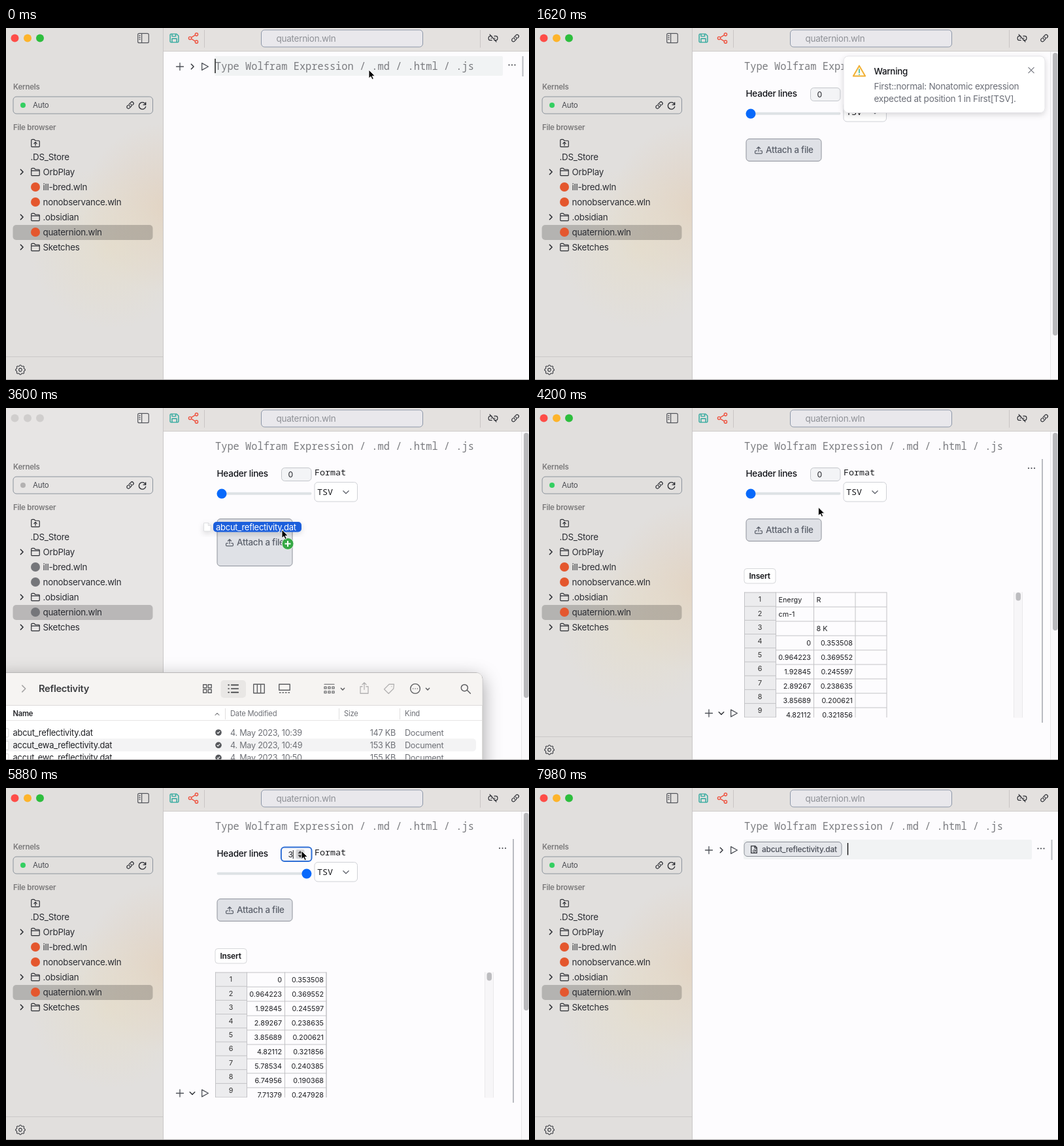
An HTML page that plays this animation: 800x538 px, repeating every 8 s.

```html
<!DOCTYPE html>
<html lang="en">
<head>
<meta charset="utf-8">
<title>Notebook: attach a data file</title>
<style>
  html, body { margin: 0; width: 100%; height: 100%; overflow: hidden; background: #fdfcfe; }
  svg { display: block; width: 100vw; height: 100vh; }
  text { font-family: Inter, sans-serif; letter-spacing: -.02em; white-space: pre; }
  #sheet text { letter-spacing: 0; }
  .mono { font-family: "Noto Sans Mono", monospace; letter-spacing: 0; }
</style>
</head>
<body>
<svg id="stage" viewBox="0 0 800 538"></svg>
<script>
const LOOP = 8000;
const INK = '#2b2d33', GREY = '#6e7076';

// ---- drawing helpers
const text = (x, cy, s, size = 13.4, fill = INK, more = '') =>
  `<text x="${x}" y="${cy + size * .36}" font-size="${size}" fill="${fill}" ${more}>${s}</text>`;
const mono = (x, cy, s, size, fill) => text(x, cy, s, size, fill, 'class="mono"');
const rect = (x, y, w, h, r, fill, stroke = 'none', more = '') =>
  `<rect x="${x}" y="${y}" width="${w}" height="${h}" rx="${r}" fill="${fill}" stroke="${stroke}" ${more}/>`;
const dot = (x, y, r, fill, more = '') => `<circle cx="${x}" cy="${y}" r="${r}" fill="${fill}" ${more}/>`;
const line = (x1, y1, x2, y2, stroke, w = 1) =>
  `<path d="M${x1} ${y1}L${x2} ${y2}" stroke="${stroke}" stroke-width="${w}"/>`;
const icon = (x, y, size, d, stroke = INK, w = 1.2, fill = 'none') =>
  `<path transform="translate(${x - size / 2} ${y - size / 2}) scale(${size / 24})" d="${d}" fill="${fill}"
    stroke="${stroke}" stroke-width="${w * 24 / size}" stroke-linecap="round" stroke-linejoin="round"/>`;
const group = (id, body, more = '') => `<g id="${id}" ${more}>${body}</g>`;

const ICON = {
  right: 'M8 3l9 9-9 9',
  down: 'M3 8l9 9 9-9',
  up: 'M3 16l9-9 9 9',
  plus: 'M12 1v22M1 12h22',
  play: 'M4 2v20l18-10z',
  folder: 'M2 9V5q0-2 2-2h5l3 3h8q2 0 2 2v11q0 2-2 2H4q-2 0-2-2V9h20',
  upFolder: 'M2 5q0-2 2-2h5l3 3h8q2 0 2 2v11q0 2-2 2H4q-2 0-2-2zM12 18v-8M8.5 13l3.5-3.5 3.5 3.5',
  link: 'M13.2 8.7a4.5 4.5 0 0 1 1.2 7.2l-4.5 4.5a4.5 4.5 0 0 1-6.4-6.4L5.3 12.3M18.7 11.7l1.8-1.8a4.5 4.5 0 0 0-6.4-6.4L9.6 8a4.5 4.5 0 0 0 1.2 7.2',
  unlink: 'M9 7H5a4 4 0 0 0-4 4v2a4 4 0 0 0 4 4h4M15 7h4a4 4 0 0 1 4 4v2a4 4 0 0 1-4 4h-4M7 12h2M15 12h2M4 3l16 18',
  refresh: 'M20 5v6h-6M20 11A9 9 0 1 0 20 16',
  panel: 'M4 3h16q2.5 0 2.5 2.5v13q0 2.5-2.5 2.5H4q-2.5 0-2.5-2.5v-13Q1.5 3 4 3zM9 3v18M4 7h2M4 10.5h2M4 14h2',
  save: 'M3 5q0-2 2-2h12l4 4v12q0 2-2 2H5q-2 0-2-2zM7 3v5h8V3M7 21v-8h10v8',
  share: 'M8 10.5l8-5M8 13.5l8 5M8 12a3 3 0 1 1-6 0 3 3 0 0 1 6 0zM22 4a3 3 0 1 1-6 0 3 3 0 0 1 6 0zM22 20a3 3 0 1 1-6 0 3 3 0 0 1 6 0z',
  upload: 'M12 16V3M7 8l5-5 5 5M7 14H4q-2 0-2 2v4q0 2 2 2h16q2 0 2-2v-4q0-2-2-2h-3',
  cross: 'M3 3l18 18M21 3L3 21',
  doc: 'M4 2h11l5 5v15H4zM14 2v6h6',
  grid: 'M2 2h8v8H2zM14 2h8v8h-8zM2 14h8v8H2zM14 14h8v8h-8z',
  list: 'M8 4h15M8 12h15M8 20h15M1.5 4h1.5M1.5 12h1.5M1.5 20h1.5',
  columns: 'M1 3h22v18H1zM8.5 3v18M15.5 3v18',
  gallery: 'M1 3h22v12H1zM2 20h2M8 20h2M14 20h2M20 20h2',
  rows: 'M2 3h20M2 8h4v4H2zM10 8h4v4h-4zM18 8h4v4h-4zM2 17h4v4H2zM10 17h4v4h-4zM18 17h4v4h-4z',
  export: 'M12 15V1M8 5l4-4 4 4M8 9H4v14h16V9h-4',
  tag: 'M22 3l-10 0L2 13l9 9 10-10zM17 7.5h.1',
  more: 'M23 12a11 11 0 1 1-22 0 11 11 0 0 1 22 0zM7 12h.1M12 12h.1M17 12h.1',
  search: 'M17 10a7.5 7.5 0 1 1-15 0 7.5 7.5 0 0 1 15 0zM15.5 15.5L23 23'
};

const gear = (x, y) => {
  let d = '';
  for (let i = 0; i < 32; i++) {
    const r = i % 4 < 2 ? 11 : 9, a = (i - .5) * Math.PI / 16;
    d += (i ? 'L' : 'M') + (12 + r * Math.cos(a)).toFixed(1) + ' ' + (12 + r * Math.sin(a)).toFixed(1);
  }
  return icon(x, y, 16, d + 'ZM15.5 12a3.5 3.5 0 1 1-7 0 3.5 3.5 0 0 1 7 0z', '#3c3e44', 1.1);
};
const dots = (x, y) => [-4.5, 0, 4.5].map(k => dot(x + k, y, 1.1, '#45474d')).join('');
const controls = (y, open) =>
  icon(266, y, 12, ICON.plus, '#4c4f56', 1.3) +
  icon(285, y, 10, open ? ICON.down : ICON.right, '#33353b', 1.5) +
  icon(304, y, 13, ICON.play, '#4c4f56', 1.3);
const inputCell = (y) =>
  rect(319, y, 441, 30, 2, '#f1f3f4') + controls(y + 16) + dots(774, y + 13.5) +
  line(790.5, y, 790.5, y + 31, '#b9bbc1', 2);

// ---- scene parts
function sidebar() {
  const rows = [
    ['folder', 'OrbPlay', 220], ['book', 'ill-bred.wln', 243], ['book', 'nonobservance.wln', 266],
    ['folder', '.obsidian', 289], ['book', 'quaternion.wln', 312], ['folder', 'Sketches', 335]
  ];
  const tree = rows.map(([kind, name, y]) => text(56.5, y, name) + (kind === 'folder'
    ? icon(24, y, 10, ICON.right, '#26282d', 1.5) + icon(45, y, 15, ICON.folder)
    : dot(45, y, 7, '#e4572e', 'class="book"'))).join('');
  return rect(0, 0, 241, 538, 0, '#e7e5e4') +
    group('tint', rect(0, 0, 241, 538, 0, '#e1dfdd') +
      rect(0, 0, 241, 538, 0, 'url(#tan)') + rect(0, 0, 241, 538, 0, 'url(#sand)')) +
    [13.5, 33, 52].map(x => dot(x, 15.5, 6, '#d0cecd', 'class="light"')).join('') +
    icon(210, 15.5, 19, ICON.panel, '#55575d') +
    text(11, 90, 'Kernels', 11.5, '#7b7a7b', 'font-weight="600"') +
    rect(11, 105, 213.5, 26, 5, 'none', '#8b939c') +
    dot(26, 118, 4, '#34cf62', 'id="status"') + text(41, 118, 'Auto', 11.6, '#4b4d53') +
    icon(190, 118, 12.5, ICON.link) + icon(209, 118, 14, ICON.refresh, INK, 1.4) +
    text(11, 151.5, 'File browser', 11.5, '#7b7a7b', 'font-weight="600"') +
    icon(45, 176, 15, ICON.upFolder) + text(37.5, 197, '.DS_Store') +
    rect(10.5, 301, 214, 23, 5, '#000', 'none', 'fill-opacity=".2"') + tree +
    line(0, 502.5, 240, 502.5, '#cbc9c8') + gear(22, 522.5) +
    line(240.5, 0, 240.5, 538, '#c9c7c7');
}

function toolbar() {
  return rect(241, 0, 559, 35, 0, '#e4e1df') + line(241, 35.5, 800, 35.5, '#cfcccb') +
    icon(257.5, 15.5, 17, ICON.save, '#2aa79b', 1.4) + icon(286.5, 15.5, 17, ICON.share, '#ee5340', 1.4) +
    line(303.5, 3, 303.5, 30, '#c9c5c4') + line(725.5, 3, 725.5, 30, '#c9c5c4') +
    rect(390.5, 3, 247, 26, 5, '#e9e8ec', '#8d97a8') + text(413.5, 16, 'quaternion.wln', 13.5, '#8f9197') +
    icon(745, 15.5, 15, ICON.unlink) + icon(779, 15.5, 13, ICON.link);
}

function widget() {
  const field = rect(421.5, 91.5, 45.5, 20, 5, '#f3f4f6', '#c3c6cb') +
    rect(420.9, 90.4, 46.6, 21.6, 5, '#f8f8fa', '#2f6fd6', 'stroke-width="2" id="ring"') +
    rect(443.5, 94, 13, 14, 2, '#d3d3d5', 'none', 'id="spinHover"') +
    group('spin', icon(450, 98.2, 7, 'M2 17l10-12 10 12z', '#333', .5, '#333') +
      icon(450, 104.2, 7, 'M2 7l10 12 10-12z', '#333', .5, '#333')) +
    text(431.5, 101.5, '0', 12.2, '#22242a', 'id="count"') +
    group('spinCaret', line(.5, 95, .5, 108, '#222'));
  return text(322.5, 100.5, 'Header lines', 13.6, '#111318', 'font-weight="500"') + field +
    mono(472, 98, 'Format', 13.35, '#18191d') +
    rect(472, 113.5, 65.5, 29.5, 5, '#fff', '#cfd1d6') + mono(476, 128.5, 'TSV', 13.35, '#18191d') +
    icon(520, 128.5, 11, ICON.down, '#666a72', 1.4) +
    rect(322.5, 128.8, 145, 4, 2, '#dee2e5') + dot(330, 131, 7.5, '#0869fb', 'id="knob"') +
    rect(323, 169.5, 115, 34, 5, '#dfe1e6', '#8e929b', 'id="drop"') +
    group('dropLabel', icon(342, 186.5, 13, ICON.upload, '#5b606b') +
      text(353, 186.5, 'Attach a file', 13.4, '#5b606b', 'font-weight="500"'));
}

function tableFrame() {
  let head = rect(320, 281.5, 48, 200, 0, '#ececee');
  for (let i = 0; i < 10; i++) {
    const y = 282 + i * 21.2;
    head += line(320, y, 368, y, '#c3c3c6') +
      text(344, y + 10.5, i + 1, 10.8, '#333', 'text-anchor="middle"');
  }
  return rect(320, 245.5, 48, 22.5, 4, '#fff', '#d6d7da') +
    text(327.5, 257, 'Insert', 12, '#15161a', 'font-weight="600"') +
    group('sheet', head + group('cells', ''), 'clip-path="url(#sheetClip)"') +
    rect(732, 281.5, 14, 192, 0, '#f7f6f8') + line(732.5, 281.5, 732.5, 473, '#eae9eb') +
    line(745.5, 281.5, 745.5, 473, '#eae9eb') + rect(735.5, 282, 7.5, 12.5, 3.7, '#bdbdc0');
}

// Lines of the file once the first `skip` have been dropped.
const HEADS = [['Energy', 'R'], ['cm-1', ''], ['', '8 K']];
const VALUES = [.353508, .369552, .245597, .238635, .200621, .321856, .240385, .190368, .247928];
function cells(skip) {
  const width = skip < 3 ? 538 : 490;
  const lines = HEADS.concat(VALUES.map((v, i) => [i ? (i * .9642234).toPrecision(6) : '0', v.toFixed(6)]));
  let out = '';
  lines.slice(skip, skip + 9).forEach((row, i) => {
    const y = 282 + i * 22;
    out += line(368, y, width, y, '#c3c3c6');
    row.forEach((s, c) => {
      const isNumber = i + skip >= HEADS.length;
      out += text((isNumber ? [422, 486] : [372.5, 430.5])[c], y + 11, s, 10.8, '#1d1e22',
        isNumber ? 'text-anchor="end"' : '');
    });
  });
  return out + [320.5, 368.5, 426.5, 490, width].map(x => line(x, 281.5, x, 474, '#c3c3c6')).join('');
}

function warning() {
  return rect(472, 43, 308, 86.5, 7, '#fff', '#e3e2e6', 'filter="url(#soft)"') +
    icon(496, 66, 20, 'M12 2L23 21H1z', '#f2b035', 2, '#fffbe9') +
    icon(496, 66.5, 20, 'M12 8v6M12 17.5v.2', '#43b9a8', 1.7) +
    text(518.5, 66.5, 'Warning', 13.4, '#111318', 'font-weight="500"') +
    icon(759, 64.5, 11, ICON.cross, '#777a82', 1.2) +
    text(518.5, 89.5, 'First::normal: Nonatomic expression', 13.6, '#6b6e77') +
    text(518.5, 108.5, 'expected at position 1 in First[TSV].', 13.6, '#6b6e77');
}

function finder() {
  const files = [['abcut', '10:39', 147], ['accut_ewa', '10:49', 153], ['accut_ewc', '10:50', 155]];
  const rows = files.map(([name, time, kb], i) => {
    const y = 496 + i * 19.3;
    return (i === 1 ? rect(-10, y - 10, 729, 19.5, 5, '#f3f3f4') : '') +
      rect(-7, y - 6, 11, 13, 1, '#fff', '#d5d5d5') +
      text(10.5, y, name + '_reflectivity.dat', 12.95, '#202125') +
      dot(325, y, 4.8, '#56585c') + icon(325, y, 5, 'M3 13l6 6L21 5', '#fff', 1.1) +
      text(343, y, '4. May 2023, ' + time, 12.65, GREY) +
      text(596, y, kb + ' KB', 12.65, GREY, 'text-anchor="end"') + text(610, y, 'Document', 12.65, GREY);
  }).join('');
  const titles = [['Date Modified', 343], ['Size', 517], ['Kind', 610]];
  const C = '#5d5e61', PALE = '#b3b2b2';
  return rect(-20, 404.5, 749, 160, 10, '#fff', '#b9b7b7', 'filter="url(#deep)"') +
    `<path d="M-20 454V405H719q9.5 0 9.5 9.5V454z" fill="#f6f4f2"/>` +
    icon(27, 429, 13, ICON.right, '#a5a4a4', 1.6) +
    text(50, 429, 'Reflectivity', 14.7, '#3d3e41', 'font-weight="600"') +
    rect(328.5, 416, 38.5, 27, 5, '#e9e7e5') +
    icon(308, 429, 15, ICON.grid, C, 1.4) + icon(347.5, 429, 17, ICON.list, '#3f4043', 1.6) +
    icon(387, 429, 18, ICON.columns, C, 1.4) + icon(426, 429, 18, ICON.gallery, C, 1.4) +
    icon(494.5, 429, 18, ICON.rows, C, 1.2) + icon(515, 429.5, 7, ICON.down, C, 1.5) +
    icon(548, 428, 18, ICON.export, PALE, 1.3) + icon(586, 429, 18, ICON.tag, PALE, 1.3) +
    icon(626, 429, 16, ICON.more, C, 1.4) + icon(645, 429.5, 7, ICON.down, C, 1.5) +
    icon(703, 429, 16, ICON.search, C, 1.5) +
    line(0, 454.5, 728, 454.5, '#dddbda') + line(0, 477.5, 728, 477.5, '#e6e5e5') +
    text(10.5, 467, 'Name', 11.2, '#25262a', 'font-weight="600"') +
    icon(323, 468, 8, ICON.up, '#85868a', 1.1) +
    titles.map(([s, x]) => text(x, 467, s, 11.2, GREY) + line(x - 7.5, 459, x - 7.5, 476, '#e0dfdf')).join('') + rows;
}

function pointer() {
  const drag = icon(-114, -4, 15, ICON.doc, '#dcdde0', 1, '#fff') +
    rect(-105, -12, 135, 15.5, 5, '#1c5fdc') + text(-101, -4, 'abcut_reflectivity.dat', 13, '#fff');
  const badge = dot(9, 21.5, 9, '#36a845', 'stroke="#e9f3e9"') +
    line(4.5, 21.5, 13.5, 21.5, '#fff', 2) + line(9, 17, 9, 26, '#fff', 2);
  return group('mouse', group('drag', drag, 'filter="url(#soft)"') + group('badge', badge) +
    group('arrow', '<path d="M0 0V12.8L3 10.2L5.1 14.6L7.3 13.6L5.2 9.3H9.3Z" fill="#000" stroke="#fff" stroke-width=".9"/>') +
    group('beam', '<path d="M-3.5-7Q0-7 0-5V5.5Q0 7.5-3.5 7.5M3.5-7Q0-7 0-5M0 5.5Q0 7.5 3.5 7.5M-2 2.5H2" fill="none" stroke="#111" stroke-width="1.3"/>'));
}

const blur = (id, dy, dev, alpha) =>
  `<filter id="${id}" x="-20%" y="-30%" width="140%" height="170%"><feDropShadow dx="0" dy="${dy}" stdDeviation="${dev}" flood-opacity="${alpha}"/></filter>`;
const glow = (id, cx, cy, r, color, alpha) =>
  `<radialGradient id="${id}" gradientUnits="userSpaceOnUse" cx="${cx}" cy="${cy}" r="${r}">
    <stop offset="0" stop-color="${color}" stop-opacity="${alpha}"/><stop offset="1" stop-color="${color}" stop-opacity="0"/></radialGradient>`;

document.getElementById('stage').innerHTML =
  `<defs>${blur('soft', 3, 4, .14)}${blur('deep', 8, 14, .36)}
    ${glow('tan', 245, 275, 130, '#e2cfbb', .75)}${glow('sand', 160, 335, 125, '#e6ddc8', .65)}
    <clipPath id="sheetClip"><rect x="320" y="281" width="220" height="192"/></clipPath></defs>` +
  rect(241, 35, 559, 503, 0, '#fdfcfe') + sidebar() + toolbar() +
  group('firstCell', inputCell(43)) +
  mono(320, 58.5, 'Type Wolfram Expression / .md / .html / .js', 15.35, '#7a7b7f') +
  group('firstCaret', line(320, 47, 320, 69, '#111', 1.4)) +
  group('widget', widget() + rect(789, 36, 11, 502, 0, '#f9f8fa') + line(788.5, 36, 788.5, 538, '#e8e7e9') +
    rect(792, 38, 7.5, 432, 3.7, '#b9b9bc', 'none', 'id="thumb"')) +
  group('table', tableFrame()) +
  group('hover', controls(466.5, true) + dots(759.5, 92) + line(776, 78, 776, 481, '#b9bbc1', 2)) +
  group('lastCell', inputCell(79) + rect(320, 82.5, 149, 22, 5, '#e4e6ea', '#8c9099') +
    icon(335, 94, 13, ICON.doc, '#34363c', 1.3) + icon(335.5, 96, 5, ICON.refresh, '#34363c', 1) +
    text(347, 94, 'abcut_reflectivity.dat', 11.9, '#4b4f59', 'font-weight="500"')) +
  group('lastCaret', line(478.5, 84, 478.5, 102.5, '#111', 1.4)) +
  group('warning', warning()) + group('finder', finder()) +
  line(0, 537.5, 800, 537.5, '#a5a3a4') + pointer();

// ---- motion
const $ = {};
document.querySelectorAll('[id]').forEach(el => $[el.id] = el);
const books = document.querySelectorAll('.book'), lights = document.querySelectorAll('.light');
const LIGHTS = ['#fe4d48', '#fdb42b', '#2dbe3e'];

const show = (id, on) => $[id].setAttribute('display', on ? 'inline' : 'none');
const set = (id, attrs) => { for (const k in attrs) $[id].setAttribute(k, attrs[k]); };
const within = (t, a, b) => t >= a && t < b;
const ramp = (t, a, b) => Math.min(1, Math.max(0, (t - a) / (b - a)));
const ease = k => k * k * (3 - 2 * k);

const ROUTE = [ // time, x, y
  [150, 555, 64], [740, 470, -20], [2280, 330, 545], [2780, 112, 500], [2920, 112, 500],
  [3500, 422, 186], [3840, 422, 186], [4700, 452, 96], [6020, 452, 96], [6540, 343, 244], [6760, 344, 256]
];
function mouseAt(t) {
  const i = ROUTE.findIndex(p => p[0] > t);
  if (i < 1) return (i ? ROUTE[ROUTE.length - 1] : ROUTE[0]).slice(1);
  const [t0, x0, y0] = ROUTE[i - 1], [t1, x1, y1] = ROUTE[i], k = ease(ramp(t, t0, t1));
  return [x0 + (x1 - x0) * k, y0 + (y1 - y0) * k];
}

let shown = -1;
function render(t) {
  const made = 960, opened = 2280, dropped = 3780, loaded = 3900, closed = 4080, inserted = 7140;
  const active = !within(t, opened, closed);
  const blink = (t + 250) % 1000 < 600;
  const count = (t >= 5100) + (t >= 5460) + (t >= 5760);
  const focus = t >= 5100;
  const [x, y] = mouseAt(t);

  show('tint', active);
  lights.forEach((el, i) => el.setAttribute('fill', active ? LIGHTS[i] : '#d0cecd'));
  books.forEach(el => el.setAttribute('fill', active ? '#e4572e' : '#75767a'));
  set('status', { fill: active ? '#34cf62' : '#b3b1b1' });

  show('firstCell', t < made);
  show('firstCaret', t < made && blink);
  show('widget', within(t, made, inserted));
  show('table', within(t, loaded, inserted));
  show('hover', within(t, loaded, inserted));
  show('lastCell', t >= inserted);
  show('lastCaret', t >= inserted && blink);
  show('finder', !active);
  set('warning', { opacity: ramp(t, 1320, 1440) * (1 - ramp(t, 2000, 2140)) });

  const over = within(t, 3420, dropped);
  set('drop', { height: over ? 72 : 34 });
  set('dropLabel', { transform: `translate(0 ${over ? 19 : 0})` });
  set('thumb', { height: t < opened ? 432 : t < loaded ? 405 : 302 });
  set('knob', { cx: 330 + count * 43.3 });
  show('ring', focus);
  show('spin', t >= 4600);
  show('spinHover', within(t, 4600, 6060));
  show('spinCaret', focus && blink && t < 6000);
  if (count !== shown) {
    shown = count;
    $.count.textContent = count;
    $.cells.innerHTML = cells(count);
  }
  set('spinCaret', { transform: `translate(${431.5 + $.count.getComputedTextLength()} 0)` });

  const beam = within(t, 6400, 6640);
  set('mouse', { transform: `translate(${x.toFixed(2)} ${y.toFixed(2)})` });
  show('mouse', t < 740 || within(t, opened, 7300));
  show('arrow', !beam);
  show('beam', beam);
  show('drag', within(t, 2920, dropped));
  show('badge', over);
}

const start = performance.now();
(function tick() {
  render((performance.now() - start) % LOOP);
  requestAnimationFrame(tick);
})();
</script>
</body>
</html>
```
